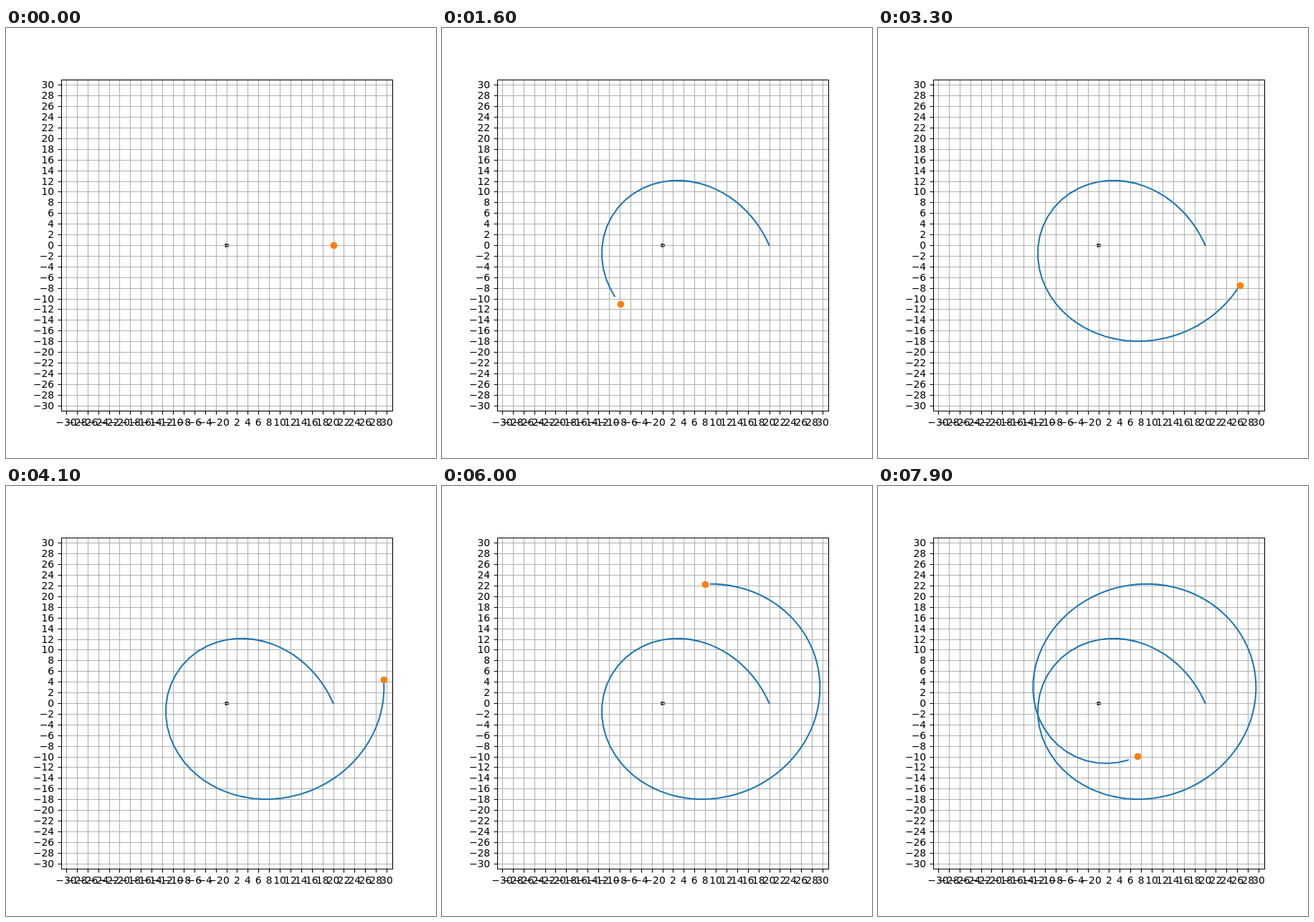
An HTML page with a canvas that plays this animation: 600 px wide and 600 px high, repeating every 8000 ms.

```html
<!DOCTYPE html>
<html lang="en">
<head>
<meta charset="utf-8">
<title>Precessing orbit</title>
<style>
  html, body { margin: 0; width: 100%; height: 100%; overflow: hidden; background: #fff; }
  canvas { display: block; width: 600px; height: 600px; }
</style>
</head>
<body>
<canvas id="plot" width="600" height="600"></canvas>
<script>
const canvas = document.getElementById('plot');
const ctx = canvas.getContext('2d');

// Plot area, in pixels and data units
const LEFT = 76.5, TOP = 72, SIZE = 462, LIMIT = 31;
const SCALE = SIZE / (2 * LIMIT);
const toX = x => LEFT + (x + LIMIT) * SCALE;
const toY = y => TOP + (LIMIT - y) * SCALE;
const snap = p => Math.floor(p + 0.5) + 0.5;

const FRAME_MS = 100, FRAMES = 80, STEPS_PER_FRAME = 2;
const HAIRLINE = 1.11;

// Orbit: inverse radius as a function of the angle
const START = 148.12 * Math.PI / 180;
const OMEGA = 0.7952;
const MOMENTUM = 22.16;

function inverseRadius(phi) {
  const t = OMEGA * (phi - START);
  return 0.0633 + 0.02926 * Math.cos(t) - 0.0006 * Math.cos(2 * t);
}

const sweep = phi => MOMENTUM * inverseRadius(phi) ** 2;

function traceOrbit(count) {
  const points = [];
  const sub = 40;
  const firstSweep = sweep(0);
  let phi = 0;
  for (let i = 0; i < count; i++) {
    const r = 1 / inverseRadius(phi);
    // the drawn angle lags by half a step
    const angle = phi - (sweep(phi) - firstSweep) / 2;
    points.push([toX(r * Math.cos(angle)), toY(r * Math.sin(angle))]);
    for (let k = 0; k < sub; k++) {
      const mid = phi + sweep(phi) / sub / 2;
      phi += sweep(mid) / sub;
    }
  }
  return points;
}

const orbit = traceOrbit(FRAMES * STEPS_PER_FRAME);

function line(x1, y1, x2, y2) {
  ctx.moveTo(x1, y1);
  ctx.lineTo(x2, y2);
}

function disc(x, y, r, color) {
  ctx.fillStyle = color;
  ctx.beginPath();
  ctx.arc(x, y, r, 0, 2 * Math.PI);
  ctx.fill();
}

function eachTick(draw) {
  for (let v = -30; v <= 30; v += 2) draw(v, toX(v), toY(v));
}

function strokeTicks(color, draw) {
  ctx.strokeStyle = color;
  ctx.lineWidth = HAIRLINE;
  ctx.lineCap = 'butt';
  ctx.beginPath();
  eachTick((v, x, y) => draw(snap(x), snap(y)));
  ctx.stroke();
}

function drawGrid() {
  disc(308, 303.3, 2.8, '#000');
  strokeTicks('#b0b0b0', (x, y) => {
    line(x, TOP, x, TOP + SIZE);
    line(LEFT, y, LEFT + SIZE, y);
  });
}

function drawAxes() {
  const left = snap(LEFT), bottom = snap(TOP + SIZE);
  strokeTicks('#000', (x, y) => {
    line(left - 5, y, left, y);
    line(x, bottom, x, bottom + 5);
  });
  ctx.strokeRect(left, snap(TOP), SIZE, SIZE);

  ctx.fillStyle = '#000';
  ctx.font = '13.89px "DejaVu Sans", sans-serif';
  ctx.textBaseline = 'alphabetic';
  eachTick((v, x, y) => {
    const label = String(v).replace('-', '\u2212');
    ctx.textAlign = 'right';
    ctx.fillText(label, 67.2, Math.round(y) + 5);
    ctx.textAlign = 'center';
    ctx.fillText(label, x, 555);
  });
}

function drawTrail(count) {
  if (count < 2) return;
  ctx.strokeStyle = '#1f77b4';
  ctx.lineWidth = 2.083;
  ctx.lineCap = 'square';
  ctx.lineJoin = 'round';
  ctx.beginPath();
  orbit.slice(0, count).forEach(([x, y]) => ctx.lineTo(x, y));
  ctx.stroke();
}

function render(frame) {
  const step = frame * STEPS_PER_FRAME;
  const [x, y] = orbit[step];
  ctx.fillStyle = '#fff';
  ctx.fillRect(0, 0, 600, 600);
  drawGrid();
  drawTrail(step);
  disc(snap(x), snap(y), 4.86, '#ff7f0e');
  drawAxes();
}

let shown = -1;
function tick() {
  const frame = Math.floor(performance.now() / FRAME_MS) % FRAMES;
  if (frame !== shown) render(shown = frame);
  requestAnimationFrame(tick);
}
tick();
</script>
</body>
</html>
```
